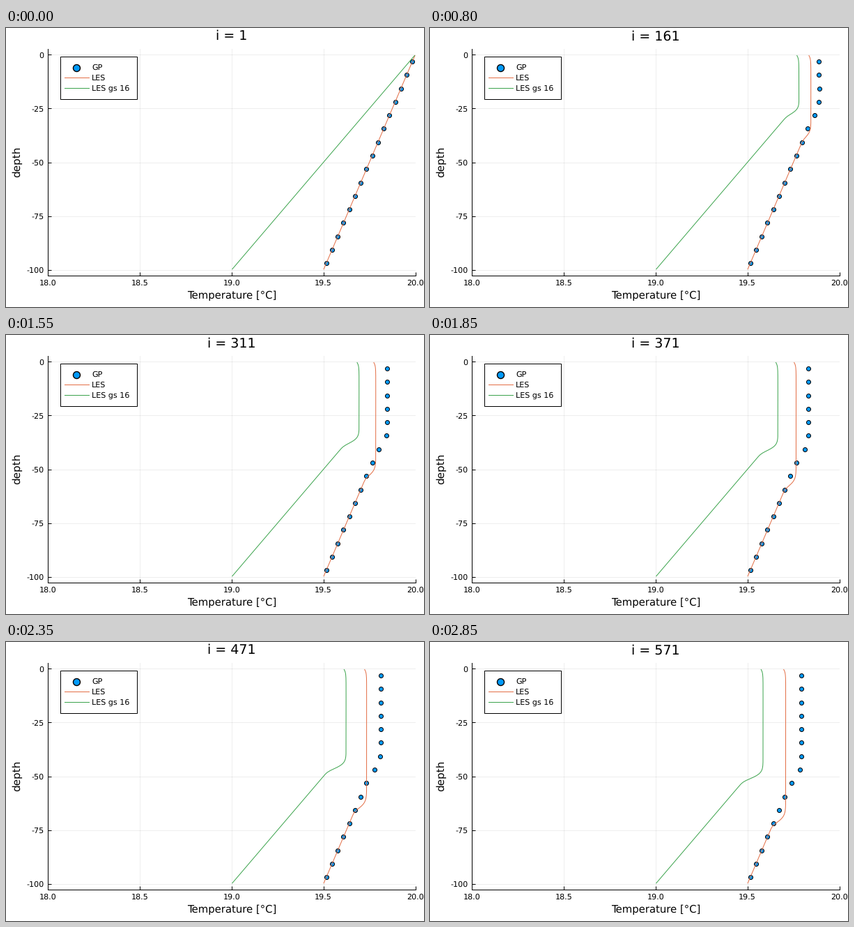
Animation, 600 px wide and 400 px high, one loop 2900 ms. Source, as a matplotlib script:

```python
import numpy as np
import matplotlib.pyplot as plt
from matplotlib.animation import FuncAnimation
from matplotlib.patches import Rectangle

W, H, DPI = 600, 400, 100
FRAMES, INTERVAL = 58, 50
PX = 72 / DPI  # points per pixel
BLUE, RED, GREEN = "#009AFA", "#E36F47", "#3DA44E"

plt.rcParams.update({"font.family": "DejaVu Sans", "font.size": 8,
                     "text.hinting": "none", "axes.linewidth": PX})

depth_line = (np.arange(128) + 0.5) * 100 / 128
depth_dots = (np.arange(16) + 0.5) * 100 / 16


def profile(depth, t, slope, cooling, deepening, width, skin=0.0):
    """Linear stratification eroded by a mixed layer growing as sqrt(t)."""
    root = np.sqrt(t)
    onset = 1 - np.exp(-t / 12)
    initial = 20 - slope * depth
    mixed = 20 - cooling * root - skin * onset * np.exp(-depth / 1.4)
    steep = (depth - deepening * root) / (width * onset + 1e-3)
    # Skewed step: leaves the mixed layer gently, meets the slope sharply
    below = 1 - np.exp(-np.exp(np.clip(steep, -60, 60)))
    return mixed + (initial - mixed) * below


fig = plt.figure(figsize=(W / DPI, H / DPI), dpi=DPI, facecolor="white")

# Plot area
left, right, top, bottom = 60.0, 587.5, 30.3, 354.9
ax = fig.add_axes([left / W, 1 - bottom / H,
                   (right - left) / W, (bottom - top) / H])
ax.set_xlim(18, 20)
ax.set_ylim(-102.586, 2.586)
xticks = np.arange(18, 20.1, 0.5)
yticks = range(-100, 1, 25)
ax.set_xticks(xticks, [f"{v:.1f}" for v in xticks])
ax.set_yticks(yticks, [str(v) for v in yticks])
ax.tick_params(direction="in", length=5 * PX, width=PX, pad=4)
ax.grid(color="black", alpha=0.065, linewidth=PX)
ax.set_axisbelow(True)
ax.spines[["top", "right"]].set_visible(False)

dot_style = dict(ls="none", marker="o", mfc=BLUE, mec="black")
dots, = ax.plot([], [], ms=6 * PX, mew=PX, zorder=3, **dot_style)
fine, = ax.plot([], [], color=RED, lw=PX, zorder=4)
coarse, = ax.plot([], [], color=GREEN, lw=PX, zorder=4)

# Overlay in pixel coordinates for labels and legend
ui = fig.add_axes([0, 0, 1, 1])
ui.set_xlim(0, W)
ui.set_ylim(H, 0)
ui.axis("off")

title = ui.text(323.4, 17.4, "", size=13.7, ha="center", va="baseline")
ui.text(324, 388, "Temperature [°C]", size=10.7,
        ha="center", va="baseline")
ui.text(16.3, 191.8, "depth", size=11, rotation=90,
        ha="center", va="center")

ui.add_patch(Rectangle((78, 41), 110, 61, fc="white", ec="black", lw=PX))
ui.plot([100.9], [56.5], ms=10 * PX, mew=1.4 * PX, **dot_style)
for y, color in ((71.3, RED), (86.3, GREEN)):
    ui.plot([83.5, 118.5], [y, y], color=color, lw=PX)
for y, label in ((60, "GP"), (75, "LES"), (90, "LES gs 16")):
    ui.text(123.4, y, label, va="baseline")


def draw(k):
    t = 10.0 * k
    title.set_text(f"i = {10 * k + 1}")
    dots.set_data(profile(depth_dots, t, 0.005, 0.00873, 2.13, 2.8),
                  -depth_dots)
    fine.set_data(profile(depth_line, t, 0.005, 0.01222, 2.97, 1.9, 0.014),
                  -depth_line)
    coarse.set_data(profile(depth_line, t, 0.01, 0.01738, 2.12, 1.7, 0.014),
                    -depth_line)
    return title, dots, fine, coarse


anim = FuncAnimation(fig, draw, frames=FRAMES, interval=INTERVAL,
                     repeat=True, repeat_delay=0, blit=False)
plt.show()
```
